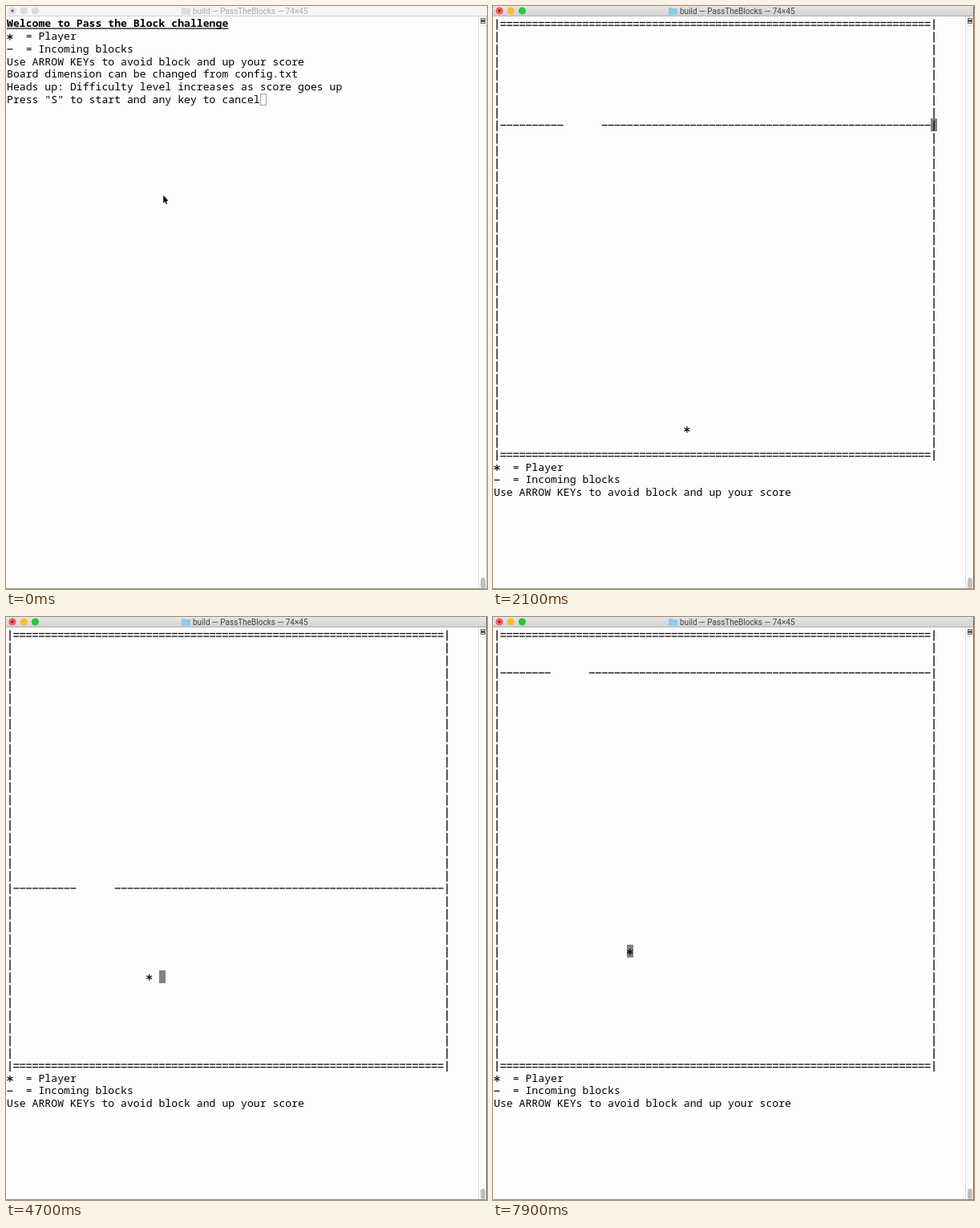
An HTML page with a canvas for the animation above (8 s loop, 600x726 px).

```html
<!DOCTYPE html>
<html lang="en">
<head>
<meta charset="utf-8">
<title>PassTheBlocks</title>
<style>
  html, body { margin: 0; width: 100%; height: 100%; overflow: hidden; background: #fefdfe; }
  canvas { display: block; }
</style>
</head>
<body>
<canvas id="stage" width="600" height="726"></canvas>
<script>
const ctx = document.getElementById('stage').getContext('2d');
const LOOP = 8000, TICK = 100;
const CELL_W = 7.9, CELL_H = 15.78, LEFT = 1, TOP = 14;
const LAST_COL = 69, LAST_ROW = 34, GAP = 6;
const FONT = '13.17px "Noto Sans Mono", "DejaVu Sans Mono", monospace';
const EDGE_AT = 100, ACTIVE_AT = 600, START_AT = 700;
const BEAM_AT = 1000, BEAM_END = 1500;

const INTRO = [
  'Welcome to Pass the Block challenge',
  '*  = Player',
  '-  = Incoming blocks',
  'Use ARROW KEYs to avoid block and up your score',
  'Board dimension can be changed from config.txt',
  'Heads up: Difficulty level increases as score goes up',
  'Press "S" to start and any key to cancel'
];

// The block falls one row per 200 ms, with a few uneven steps.
const uneven = { 19: 4300, 29: 6500 };
const drops = [];
for (let n = 1; n <= 36; n++) {
  if (n === 4) continue;
  drops.push({
    t: uneven[n] || 500 + 200 * n + (n > 14 ? 100 : 0),
    row: n > 33 ? n - 33 : n,
    gap: n > 33 ? 9 : 11
  });
}

// Player moves: direction and times.
let spot = { t: 0, col: 35, row: 33 };
const moves = [spot];
function move(dir, ...times) {
  const dx = { L: -1, R: 1, U: 0 }[dir], dy = dir === 'U' ? -1 : 0;
  for (const t of times) {
    spot = { t, col: spot.col + dx, row: spot.row + dy, from: spot };
    moves.push(spot);
  }
}
move('L', 1480, 1600, 1680, 1880);
move('U', 2000);
move('L', 2080);
move('U', 2200, 2480);
move('L', 2720, 2920, 3400, 3620, 3640);
move('U', 3820, 4020, 4220);
move('L', 4320, 4500, 4700, 4900, 5100, 5220, 5420, 5700, 5780, 5900);
move('U', 6500, 6700);
move('R', 7100, 7300, 7500, 7700, 7780, 7900);

const latest = (list, t) => list.filter(e => e.t <= t).pop();
const x = col => LEFT + col * CELL_W;
const y = row => TOP + row * CELL_H;

function rect(color, ...box) {
  ctx.fillStyle = color;
  ctx.fillRect(...box);
}

function disc(color, cx, cy, r) {
  ctx.fillStyle = color;
  ctx.beginPath();
  ctx.arc(cx, cy, r, 0, Math.PI * 2);
  ctx.fill();
}

function bar(col, row) {
  rect('#111', x(col) + 3.3, y(row) + 2.4, 1.4, 13.2);
}

function dash(col, row, dy = 0) {
  rect('#111', x(col) + 0.4, y(row) + 7.6 + dy, 7, 1.3);
}

function star(col, row) {
  const cx = x(col) + CELL_W / 2, cy = y(row) + 8.6;
  ctx.strokeStyle = '#000';
  ctx.lineWidth = 1.15;
  ctx.beginPath();
  for (let i = 0; i < 3; i++) {
    const a = Math.PI / 2 + i * Math.PI / 3;
    const dx = 4 * Math.cos(a), dy = 4 * Math.sin(a);
    ctx.moveTo(cx - dx, cy - dy);
    ctx.lineTo(cx + dx, cy + dy);
  }
  ctx.stroke();
}

function line(text, row, bold) {
  if (text[0] === '*') star(0, row);
  else if (text[0] === '-') dash(0, row);
  ctx.font = (bold ? '700 ' : '500 ') + FONT;
  ctx.textAlign = 'left';
  ctx.fillStyle = '#000';
  ctx.fillText(text.replace(/^[*-]/, ' '), LEFT, y(row) + 12.3);
}

function titleBar(active) {
  if (active) {
    const g = ctx.createLinearGradient(0, 0, 0, 13);
    g.addColorStop(0, '#e7e6e7');
    g.addColorStop(1, '#d1d0d1');
    rect(g, 0, 0, 600, 13);
  } else {
    rect('#f6f5f6', 0, 0, 600, 13);
  }
  rect(active ? '#b4b3b4' : '#d5d4d5', 0, 12, 600, 1);

  const lights = active ? ['#fc5b57', '#fdbc2e', '#28c840'] : ['#dcdbdc', '#dcdbdc', '#dcdbdc'];
  lights.forEach((c, i) => disc(c, 8 + i * 14.2, 6, 4.6));
  disc(active ? '#7e1512' : '#555', 8, 6, 1.4);

  const folder = active ? '#8fcbe6' : '#dddcdd';
  rect(folder, 219, 2, 5, 2);
  rect(folder, 219, 3, 11, 8);

  ctx.font = '10px Roboto, "Open Sans", sans-serif';
  ctx.textAlign = 'center';
  ctx.fillStyle = active ? '#454445' : '#acabac';
  ctx.fillText('build — PassTheBlocks — 74×45', 304.7, 9.6);
}

function scrollBar() {
  rect('#fafafa', 589, 13, 11, 712);
  rect('#dedede', 589, 13, 1, 712);
  rect('#e8e8e8', 590, 24, 10, 1);
  ctx.strokeStyle = '#666';
  ctx.lineWidth = 1;
  ctx.strokeRect(592.5, 15.5, 5, 6);
  rect('#555', 593, 17, 4, 3);
  ctx.fillStyle = '#bfbfbf';
  ctx.beginPath();
  ctx.roundRect(592, 712, 6, 13, 3);
  ctx.fill();
}

function windowEdge(dark) {
  if (dark) rect('#6c6c6c', 599, 0, 1, 726);
  else rect('#c8c8c8', 599, 13, 1, 712);
  rect('#8c8c8c', 0, 725, 600, 1);
}

function arrow() {
  const pts = [[196.3, 235.8], [196.3, 245.4], [198.4, 243.5], [199.8, 246.8], [201.2, 246.2], [199.8, 243], [202.4, 242.6]];
  ctx.beginPath();
  pts.forEach(p => ctx.lineTo(...p));
  ctx.closePath();
  ctx.lineWidth = 1;
  ctx.strokeStyle = '#fff';
  ctx.stroke();
  ctx.fillStyle = '#000';
  ctx.fill();
}

function beam() {
  const cx = 196.5, cy = 236.5;
  ctx.strokeStyle = '#333';
  ctx.lineWidth = 1;
  ctx.beginPath();
  for (const s of [-1, 1]) {
    const end = cy + s * 5;
    ctx.moveTo(cx - 3, end);
    ctx.quadraticCurveTo(cx, end, cx, cy + s * 3.5);
    ctx.quadraticCurveTo(cx, end, cx + 3, end);
  }
  ctx.moveTo(cx, cy - 4.5);
  ctx.lineTo(cx, cy + 4.5);
  ctx.moveTo(cx - 1.5, cy + 2);
  ctx.lineTo(cx + 1.5, cy + 2);
  ctx.stroke();
}

function intro() {
  INTRO.forEach((text, row) => line(text, row, row === 0));
  rect('#000', LEFT, 27.4, INTRO[0].length * CELL_W, 1.2);
  ctx.strokeStyle = '#a5a4a5';
  ctx.lineWidth = 1;
  ctx.strokeRect(317.5, 109.5, 7, 14);
}

function board(t) {
  const block = latest(drops, t), player = latest(moves, t);
  const moved = player.t > block.t;
  const caret = moved
    ? { col: player.from.col + 1, row: player.from.row }
    : { col: LAST_COL, row: block.row };
  rect('#838283', Math.round(x(caret.col)), Math.floor(y(caret.row)), 8, 16);

  for (let row = 0; row <= LAST_ROW; row++) {
    bar(0, row);
    bar(LAST_COL, row);
  }
  for (let col = 1; col < LAST_COL; col++) {
    for (const row of [0, LAST_ROW]) {
      dash(col, row, -1.7);
      dash(col, row, 1.9);
    }
    if (col < block.gap || col >= block.gap + GAP) dash(col, block.row);
  }
  star(player.col, player.row);
  INTRO.slice(1, 4).forEach((text, i) => line(text, LAST_ROW + 1 + i));
}

function draw(now) {
  const tick = Math.floor(now % LOOP / TICK) * TICK;
  rect('#fefdfe', 0, 0, 600, 726);
  titleBar(tick >= ACTIVE_AT);
  scrollBar();
  windowEdge(tick >= EDGE_AT);
  if (tick < START_AT) intro();
  else board(tick + TICK / 2);

  // Typing hides the pointer until the mouse moves again.
  if (tick < START_AT) arrow();
  else if (tick >= BEAM_AT && tick < BEAM_END) beam();
}

const begin = performance.now();
function loop() {
  draw(performance.now() - begin);
  requestAnimationFrame(loop);
}
loop();
</script>
</body>
</html>
```
